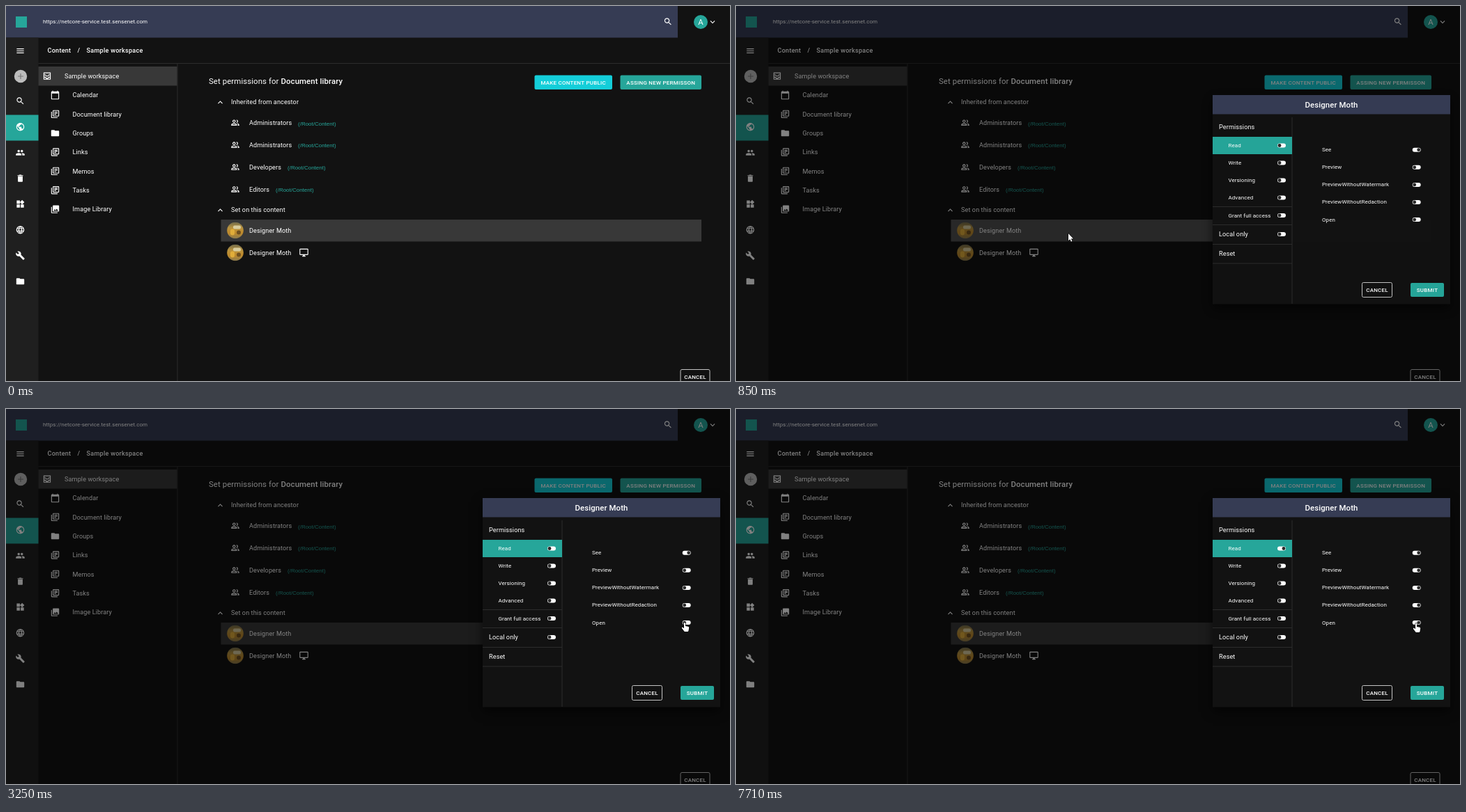
An HTML page with a canvas that plays this animation: 1039 px wide and 539 px high, repeating every 8 s.

```html
<!DOCTYPE html>
<html lang="en">
<head>
<meta charset="utf-8">
<title>Set permissions</title>
<style>
html, body { margin: 0; width: 100%; height: 100%; overflow: hidden; background: #121212; }
canvas { display: block; }
</style>
</head>
<body>
<canvas id="stage" width="1039" height="539"></canvas>
<script>
const W = 1039, H = 539, LOOP = 8000;
const TEAL = '#26a69a', SLATE = '#363c54', BG = '#121212', LINE = '#2c2c2c', WHITE = '#fff';
const SMALL = 7.99, BODY = 9.13, LARGE = 11.42;
const USER = 'Designer Moth';

const main = document.getElementById('stage').getContext('2d');
const sheet = document.createElement('canvas');
sheet.width = W;
sheet.height = H;
const dialogCtx = sheet.getContext('2d');
let c = main;

const ICONS = {
  menu: 'M3 18h18v-2H3v2zm0-5h18v-2H3v2zm0-7v2h18V6H3z',
  add: 'M19 13h-6v6h-2v-6H5v-2h6V5h2v6h6v2z',
  search: 'M15.5 14h-.79l-.28-.27C15.41 12.59 16 11.11 16 9.5 16 5.91 13.09 3 9.5 3S3 5.91 3 9.5 5.91 16 9.5 16c1.61 0 3.09-.59 4.23-1.57l.27.28v.79l5 4.99L20.49 19l-4.99-5zm-6 0C7.01 14 5 11.99 5 9.5S7.01 5 9.5 5 14 7.01 14 9.5 11.99 14 9.5 14z',
  earth: 'M12 2C6.48 2 2 6.48 2 12s4.48 10 10 10 10-4.48 10-10S17.52 2 12 2zm-1 17.93c-3.95-.49-7-3.85-7-7.93 0-.62.08-1.21.21-1.79L9 15v1c0 1.1.9 2 2 2v1.93zm6.9-2.54c-.26-.81-1-1.39-1.9-1.39h-1v-3c0-.55-.45-1-1-1H8v-2h2c.55 0 1-.45 1-1V7h2c1.1 0 2-.9 2-2v-.41c2.93 1.19 5 4.06 5 7.41 0 2.08-.8 3.97-2.1 5.39z',
  people: 'M16 11c1.66 0 2.99-1.34 2.99-3S17.66 5 16 5c-1.66 0-3 1.34-3 3s1.34 3 3 3zm-8 0c1.66 0 2.99-1.34 2.99-3S9.66 5 8 5C6.34 5 5 6.34 5 8s1.34 3 3 3zm0 2c-2.33 0-7 1.17-7 3.5V19h14v-2.5c0-2.33-4.67-3.5-7-3.5zm8 0c-.29 0-.62.02-.97.05 1.16.84 1.97 1.97 1.97 3.45V19h6v-2.5c0-2.33-4.67-3.5-7-3.5z',
  trash: 'M6 19c0 1.1.9 2 2 2h8c1.1 0 2-.9 2-2V7H6v12zM19 4h-3.5l-1-1h-5l-1 1H5v2h14V4z',
  widgets: 'M13 13v8h8v-8h-8zM3 21h8v-8H3v8zM3 3v8h8V3H3zm13.66-1.31L11 7.34 16.66 13l5.66-5.66-5.66-5.65z',
  wrench: 'M22.7 19l-9.1-9.1c.9-2.3.4-5-1.5-6.9-2-2-5-2.4-7.4-1.3L9 6 6 9 1.6 4.7C.4 7.1.9 10.1 2.9 12.1c1.9 1.9 4.6 2.4 6.9 1.5l9.1 9.1c.4.4 1 .4 1.4 0l2.3-2.3c.5-.4.5-1.1.1-1.4z',
  folder: 'M10 4H4c-1.1 0-1.99.9-1.99 2L2 18c0 1.1.9 2 2 2h16c1.1 0 2-.9 2-2V8c0-1.1-.9-2-2-2h-8l-2-2z',
  calendar: 'M20 3h-1V1h-2v2H7V1H5v2H4c-1.1 0-2 .9-2 2v16c0 1.1.9 2 2 2h16c1.1 0 2-.9 2-2V5c0-1.1-.9-2-2-2zm0 18H4V8h16v13z',
  books: 'M4 6H2v14c0 1.1.9 2 2 2h14v-2H4V6zm16-4H8c-1.1 0-2 .9-2 2v12c0 1.1.9 2 2 2h12c1.1 0 2-.9 2-2V4c0-1.1-.9-2-2-2zm0 14H8V4h12v12zM10 9h8v2h-8zM10 12h4v2h-4zM10 6h8v2h-8z',
  images: 'M22 16V4c0-1.1-.9-2-2-2H8c-1.1 0-2 .9-2 2v12c0 1.1.9 2 2 2h12c1.1 0 2-.9 2-2zm-11-4l2.03 2.71L16 11l4 5H8l3-4zM2 6v14c0 1.1.9 2 2 2h14v-2H4V6H2z',
  less: 'M12 8l-6 6 1.41 1.41L12 10.83l4.59 4.58L18 14z',
  more: 'M16.59 8.59L12 13.17 7.41 8.59 6 10l6 6 6-6z',
  desktop: 'M21 2H3c-1.1 0-2 .9-2 2v12c0 1.1.9 2 2 2h7v2H8v2h8v-2h-2v-2h7c1.1 0 2-.9 2-2V4c0-1.1-.9-2-2-2zm0 14H3V4h18v12z',
};
const OUTLINES = {
  globe: 'M12 3a9 9 0 1 0 .01 0zM12 3c-5 5-5 13 0 18 5-5 5-13 0-18zM4 9h16M4 15h16',
  inbox: 'M4 4h16v16H4zM4 9h4l2 3h4l2-3h4M4 15h4l2 3h4l2-3h4',
  group: 'M9 5a3 3 0 1 0 .01 0zM3 18v-1c0-2 4-3 6-3s6 1 6 3v1zM15 5a3 3 0 0 1 0 6M17 14c2 .5 4 1.5 4 3v1h-3',
};
const shapes = {};
for (const [name, d] of Object.entries({ ...ICONS, ...OUTLINES })) shapes[name] = new Path2D(d);
const ARROW = new Path2D('M0 0v10.3l2.3-2.1 1.6 3.5 1.6-.7-1.6-3.4h3.2z');
const HAND = new Path2D('M-1 1c0-1.4 2-1.4 2 0v4l4 .8c.9.2 1.3.9 1.2 1.8l-.7 4c-.1.8-.5 1.4-1.2 1.4h-4c-.6 0-1-.4-1.4-.9l-3-4c-.5-.9.6-1.7 1.5-1l1.6 1.2z');

// time, x, y
const PATH = [
  [70, 744, 428], [150, 560, 352], [220, 453, 327], [690, 453, 327], [790, 456, 327],
  [1000, 530, 327], [1220, 626, 325], [1320, 680, 324], [1480, 798, 322], [1700, 900, 280],
  [1900, 974, 220], [2080, 978, 224], [2180, 980, 228], [2480, 986, 268], [2780, 974, 308],
  [3250, 974, 307], [3350, 974, 307], [3950, 980, 257], [5070, 980, 257], [5560, 977, 308],
  [5930, 977, 308], [6090, 976, 307], [6310, 976, 308],
];

const clamp = v => Math.max(0, Math.min(1, v));
const bez = (a, b, u) => 3 * a * u * (1 - u) ** 2 + 3 * b * u * u * (1 - u) + u ** 3;

// cubic-bezier(.4, 0, .2, 1)
function ease(x) {
  x = clamp(x);
  let lo = 0, hi = 1;
  for (let i = 0; i < 20; i++) {
    const mid = (lo + hi) / 2;
    if (bez(.4, .2, mid) < x) lo = mid; else hi = mid;
  }
  return bez(0, 1, lo);
}

const span = (t, start, length) => ease((t - start) / length);

function rect(x, y, w, h, color, r = 0) {
  c.fillStyle = color;
  c.beginPath();
  c.roundRect(x, y, w, h, r);
  c.fill();
}

function disc(x, y, r, color) {
  c.fillStyle = color;
  c.beginPath();
  c.arc(x, y, r, 0, 7);
  c.fill();
}

function text(s, x, y, size = BODY, { weight = 400, color = WHITE, track = .0094, align = 'left', family = 'Roboto' } = {}) {
  c.font = `${weight} ${size}px ${family}, sans-serif`;
  c.letterSpacing = track * size + 'px';
  c.textAlign = align;
  c.fillStyle = color;
  c.fillText(s, x, y + size * .355);
}

function icon(name, x, y, color = WHITE, size = 13.7) {
  c.save();
  c.translate(x - size / 2, y - size / 2);
  c.scale(size / 24, size / 24);
  if (name in OUTLINES) {
    c.strokeStyle = color;
    c.lineWidth = 2;
    c.stroke(shapes[name]);
  } else {
    c.fillStyle = color;
    c.fill(shapes[name], 'evenodd');
  }
  c.restore();
}

function button(label, x, y, w, h, color) {
  if (color) rect(x, y, w, h, color, 2);
  else {
    c.strokeStyle = '#c4c4c4';
    c.lineWidth = 1;
    c.beginPath();
    c.roundRect(x + .5, y + .5, w - 1, h - 1, 2);
    c.stroke();
  }
  text(label, x + w / 2, y + h / 2, SMALL, { weight: 500, track: .0286, align: 'center' });
}

function avatar(x, y) {
  c.save();
  c.beginPath();
  c.arc(x, y, 11.8, 0, 7);
  c.clip();
  const g = c.createLinearGradient(0, y - 12, 0, y + 12);
  g.addColorStop(0, '#6f6a4c');
  g.addColorStop(.35, '#b9933f');
  g.addColorStop(.65, '#c08a2a');
  g.addColorStop(1, '#8a7a4e');
  c.fillStyle = g;
  c.fillRect(x - 12, y - 12, 24, 24);
  rect(x - 3, y - 7, 11, 5, '#d8cda0', 2);
  rect(x - 7, y - 2, 6, 9, '#e0ad3a', 3);
  rect(x + 2, y, 6, 6, '#70501f', 3);
  c.restore();
}

function ripple(t) {
  if (t < 555 || t > 1250) return;
  c.save();
  c.beginPath();
  c.rect(308.5, 307, 689.5, 31.5);
  c.clip();
  disc(453, 327, 545 * span(t, 555, 550), `rgba(255,255,255,${.15 * (1 - span(t, 720, 500))})`);
  c.restore();
}

function drawHeader() {
  rect(0, 0, 964, 45.5, SLATE);
  rect(14, 15, 16, 16, TEAL);
  text('https://netcore-service.test.sensenet.com', 53, 22.5, SMALL, { track: .0055 });
  icon('search', 950, 22.5);
  disc(997, 23, 10, TEAL);
  text('A', 997, 23, LARGE, { align: 'center', track: 0 });
  icon('more', 1014, 23);
}

function drawRail() {
  rect(0, 45.5, 46.5, H, '#1f1f1f');
  rect(0, 156.5, 46.5, 37, TEAL);
  icon('menu', 20.5, 64.5);
  disc(21, 101, 9.2, '#bdbdbd');
  icon('add', 21, 101, '#777');
  icon('search', 20.5, 136.5);
  ['earth', 'people', 'trash', 'widgets', 'globe', 'wrench', 'folder']
    .forEach((name, i) => icon(name, 20.5, 173.7 + i * 37));
}

function drawTree() {
  const crumb = { weight: 500, track: .025 };
  text('Content', 59.5, 63.5, BODY, crumb);
  text('/', 102.5, 63.5, BODY, crumb);
  text('Sample workspace', 115.5, 63.5, BODY, crumb);
  rect(46.5, 82, W, 1, LINE);
  rect(245.5, 82, 1, H, LINE);
  rect(46.5, 87, 199, 27.5, '#383838');
  icon('inbox', 59, 100.7);
  text('Sample workspace', 84, 100.5);
  [['calendar', 'Calendar'], ['books', 'Document library'], ['folder', 'Groups'], ['books', 'Links'],
   ['books', 'Memos'], ['books', 'Tasks'], ['images', 'Image Library']].forEach(([name, label], i) => {
    const y = 128 + i * 27.35;
    icon(name, 70.5, y);
    text(label, 95.5, y);
  });
}

function drawContent(t) {
  text('Set permissions for ', 291, 107.5, LARGE, { track: .0075 });
  text('Document library', 394.5, 107.5, LARGE, { weight: 500, track: .0075 });
  button('MAKE CONTENT PUBLIC', 758.5, 99.5, 111.5, 20.5, '#14ced9');
  button('ASSING NEW PERMISSON', 881.5, 99.5, 116.5, 20.5, TEAL);

  icon('less', 307.5, 138.5);
  text('Inherited from ancestor', 323, 138);
  [['Administrators', 419], ['Administrators', 419], ['Developers', 404], ['Editors', 387]].forEach(([name, x], i) => {
    const y = 168 + i * 31.9;
    icon('group', 329, y);
    text(name, 349, y);
    text('(/Root/Content)', x, y + .7, SMALL, { color: TEAL, track: 0, family: '"Liberation Sans"' });
  });

  icon('less', 307.5, 293.5);
  text('Set on this content', 323, 293);
  rect(308.5, 307, 689.5, 31.5, '#383838');
  ripple(t);
  for (const y of [322.5, 354.5]) {
    avatar(329, y);
    text(USER, 349, y);
  }
  icon('desktop', 427.5, 354.5);
  button('CANCEL', 967.5, 522, 43, 22);
}

function toggle(x, y, on) {
  rect(x, y - 3, 12, 6, WHITE, 3);
  disc(x + 3 + 6 * on, y, 2.4, '#2a2a2a');
}

function drawDialog(t) {
  const loaded = t >= 740;
  const first = span(t, 4120, 200), second = span(t, 7050, 200);
  c.clearRect(0, 0, W, H);
  c.save();
  c.shadowColor = 'rgba(0,0,0,.6)';
  c.shadowBlur = 14;
  c.shadowOffsetY = 6;
  rect(684, 128, 341, 300.5, BG);
  c.restore();
  rect(684, 128, 341, 27.5, SLATE);
  text(USER, 854.5, 142, LARGE, { weight: 500, track: .0075, align: 'center' });
  rect(797.5, 160, 1, 268, LINE);
  text('Permissions', 693, 173.5);

  if (loaded) {
    rect(684, 188, 114, 25, TEAL);
    ['Read', 'Write', 'Versioning', 'Advanced'].forEach((label, i) => {
      text(label, 706.5, 200 + i * 25, SMALL);
      toggle(777, 200.5 + i * 25, i ? 0 : second);
    });
    [['See', 1], ['Preview', first], ['PreviewWithoutWatermark', first],
     ['PreviewWithoutRedaction', second], ['Open', second]].forEach(([label, on], i) => {
      text(label, 841, 206.3 + i * 25.1, SMALL);
      toggle(970.7, 206.7 + i * 25.1, on);
    });
  }

  const shift = loaded ? 0 : -100;
  for (const y of [288, 314, 342, 369.5]) rect(684, y + shift, 114, 1, LINE);
  text('Grant full access', 706.5, 300.7 + shift, SMALL);
  toggle(777, 301 + shift, 0);
  text('Local only', 693, 327.7 + shift);
  toggle(777, 328 + shift, 0);
  text('Reset', 693, 355.5 + shift);
  button('CANCEL', 898, 397, 44, 22);
  button('SUBMIT', 968, 398, 48, 20, TEAL);
}

function drawCursor(t) {
  if (t < PATH[0][0]) return;
  let i = PATH.findIndex(p => p[0] > t);
  if (i < 0) i = PATH.length;
  const a = PATH[i - 1], b = PATH[i] || a;
  const k = b === a ? 0 : (t - a[0]) / (b[0] - a[0]);
  const x = a[1] + (b[1] - a[1]) * k, y = a[2] + (b[2] - a[2]) * k;
  const shape = x > 968 ? HAND : ARROW;
  c.save();
  c.translate(Math.round(x), Math.round(y));
  c.strokeStyle = '#000';
  c.lineWidth = 1.2;
  c.lineJoin = 'round';
  c.stroke(shape);
  c.fillStyle = WHITE;
  c.fill(shape);
  c.restore();
}

function draw(t) {
  const shown = span(t, 660, 225);
  c = main;
  rect(0, 0, W, H, BG);
  drawHeader();
  drawRail();
  drawTree();
  drawContent(t);
  if (shown > 0) {
    rect(0, 0, W, H, `rgba(0,0,0,${.5 * shown})`);
    c = dialogCtx;
    drawDialog(t);
    c = main;
    c.globalAlpha = shown;
    c.drawImage(sheet, 0, 0);
    c.globalAlpha = 1;
  }
  drawCursor(t);
}

const start = performance.now();
function tick() {
  draw((performance.now() - start) % LOOP);
  requestAnimationFrame(tick);
}
tick();
</script>
</body>
</html>
```
